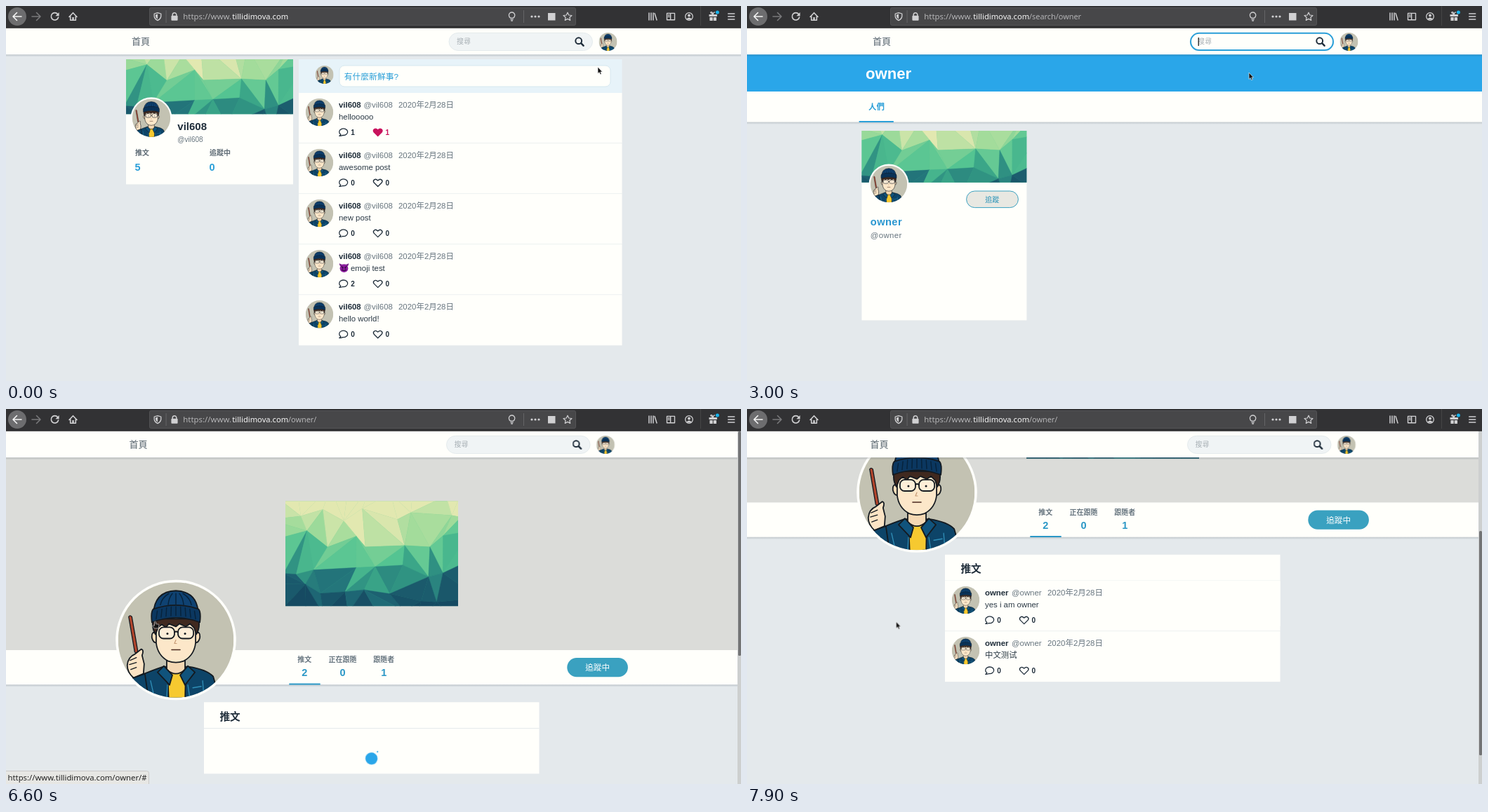
An HTML page that plays this animation: 1047 px wide and 535 px high, repeating every 8000 ms.

```html
<!DOCTYPE html>
<html lang="zh-Hant">
<head>
<meta charset="utf-8">
<title>Social feed demo</title>
<style>
html, body { margin: 0; width: 100%; height: 100%; overflow: hidden; background: #e4e9ec; }
svg#stage { display: block; width: 100vw; height: 100vh; }
text { font-family: "Liberation Sans", Arial, "Noto Sans CJK TC", "Noto Sans CJK SC", sans-serif; white-space: pre; }
.ui { font-family: "Noto Sans", "Open Sans", sans-serif; }
.b { font-weight: 700; }
.mid { text-anchor: middle; }
.line { fill: none; stroke-linecap: round; stroke-linejoin: round; }
.spin { animation: spin 2s linear infinite; }
.dot { animation: bounce 2s ease-in-out infinite; }
.late .spin, .late .dot { animation-delay: -628ms; }
.early .spin, .early .dot { animation-delay: -972ms; }
.late .dot.two { animation-delay: -1628ms; }
.early .dot.two { animation-delay: -1972ms; }
@keyframes spin { to { transform: rotate(360deg); } }
@keyframes bounce { 0%, 100% { transform: scale(0); } 50% { transform: scale(1); } }
</style>
</head>
<body>
<svg id="stage" viewBox="0 0 1047 535" preserveAspectRatio="none"></svg>
<script>
const LOOP = 8000;
const PAPER = '#fffffb', INK = '#1f2d3a', GREY = '#67757f', BLUE = '#2a9fd8', BAND = '#2aa6e9', TEAL = '#3aa1c0';
const USER = 'vil608', FOUND = 'owner', SITE = 'tillidimova.com';

// ---------- timeline ----------
const rules = [];
function track(sel, prop, keys, fmt = v => v) {
  const name = 'k' + rules.length;
  const body = keys.map(([t, v]) => `${t / LOOP * 100}%{${prop}:${fmt(v)}}`).join('');
  rules.push(`@keyframes ${name}{${body}}${sel}{animation:${name} ${LOOP}ms step-end infinite}`);
}
function show(sel, ...times) {
  const keys = times.map((t, i) => [t, 1 - i % 2]);
  if (times[0] > 0) keys.unshift([0, 0]);
  track(sel, 'opacity', keys);
}
const moveY = v => `translateY(${v}px)`;

// ---------- drawing helpers ----------
const at = (x, y, s, attr = '') => `<g transform="translate(${x} ${y})" ${attr}>${s}</g>`;
const rect = (x, y, w, h, fill, attr = '') => `<rect x="${x}" y="${y}" width="${w}" height="${h}" fill="${fill}" ${attr}/>`;
const circle = (x, y, r, fill, attr = '') => `<circle cx="${x}" cy="${y}" r="${r}" fill="${fill}" ${attr}/>`;
const path = (d, fill, attr = '') => `<path d="${d}" fill="${fill}" ${attr}/>`;
const line = (d, stroke, w = 1, attr = '') => `<path class="line" d="${d}" stroke="${stroke}" stroke-width="${w}" ${attr}/>`;
const text = (x, y, s, size, fill, cls = '', attr = '') =>
  `<text x="${x}" y="${y}" font-size="${size}" fill="${fill}" class="${cls}" ${attr}>${s}</text>`;
const group = (id, s, attr = '') => `<g id="${id}" ${attr}>${s}</g>`;
const shadow = (y, w = 1047) => rect(0, y, w, 3.4, 'url(#shade)');
const avatar = (x, y, r, ring = 0) =>
  (ring ? circle(x, y, r + ring, PAPER) : '') +
  `<use href="#face" x="${x - r}" y="${y - r}" width="${2 * r}" height="${2 * r}"/>`;
const cover = (x, y, w, h) =>
  `<svg x="${x}" y="${y}" width="${w}" height="${h}" viewBox="0 0 246 150" preserveAspectRatio="xMidYMid slice">${mosaic}</svg>`;

// ---------- low-poly cover ----------
function makeMosaic() {
  let seed = 11;
  const rnd = () => (seed = seed * 16807 % 2147483647) / 2147483647;
  const stops = [[226, 232, 176], [160, 219, 154], [84, 196, 146], [54, 160, 134], [32, 108, 120], [22, 74, 98]];
  const cols = 8, rows = 5, pts = [];
  for (let j = 0; j <= rows; j++)
    for (let i = 0; i <= cols; i++)
      pts.push([(i + (rnd() - .5) * .8) / cols * 276 - 15, (j + (rnd() - .5) * .8) / rows * 184 - 17]);
  const tone = v => {
    const k = Math.min(4.999, Math.max(0, v * 5)), i = k | 0;
    return `rgb(${stops[i].map((c, n) => Math.round(c + (stops[i + 1][n] - c) * (k - i)))})`;
  };
  const tri = (...p) => {
    const u = (p[0][0] + p[1][0] + p[2][0]) / 738, v = (p[0][1] + p[1][1] + p[2][1]) / 450;
    const c = tone(1.12 * (v - .24) + .5 * Math.abs(u - .5) + (rnd() - .5) * .22);
    return path(`M${p.map(q => q.map(n => n.toFixed(1))).join('L')}Z`, c, `stroke="${c}" stroke-width=".4"`);
  };
  let out = rect(0, 0, 246, 150, '#4cbf90');
  for (let j = 0; j < rows; j++)
    for (let i = 0; i < cols; i++) {
      const a = pts[j * (cols + 1) + i], b = pts[j * (cols + 1) + i + 1];
      const c = pts[(j + 1) * (cols + 1) + i], d = pts[(j + 1) * (cols + 1) + i + 1];
      out += rnd() < .5 ? tri(a, b, c) + tri(b, d, c) : tri(a, b, d) + tri(a, d, c);
    }
  return out;
}
const mosaic = makeMosaic();

// ---------- illustrated portrait ----------
function portrait() {
  const dark = '#141a20', o = `stroke="${dark}" stroke-width="1.8" stroke-linejoin="round"`;
  let ribs = '';
  for (let i = -4; i <= 4; i++) ribs += `M${i * 7} ${-30 - (16 - i * i) * .3}L${i * 6.6} ${-41 - (16 - i * i) * .4}`;
  for (let i = -2; i <= 2; i++) ribs += `M${i * 11} -50Q${i * 10} -60 ${i * 5} -66`;
  const lens = x => `<rect x="${x}" y="-18" width="22" height="16" rx="6.5" fill="#fdeed8" ${o}/>`;
  return circle(0, 0, 82, '#c3c2b2') + '<g clip-path="url(#round)">' +
    path('M-56 90L-49 50Q-36 44 -18 38L18 38Q44 42 53 52L64 90Z', '#0d4468', o) +
    path('M-12 40L-10 90H13L14 40Z', '#f6c930', o) +
    path('M-13 22V42Q0 54 13 42V22Z', '#f5d8b3', o) +
    path('M-17 37L-26 46L-9 64L-5 50ZM17 37L27 46L13 64L6 50Z', '#10537c', o) +
    line('M-12 64L-13 84M17 64L20 84M-36 58L-30 84M38 58L40 84M24 68L36 66', '#2f8fb8', 1.3) +
    path('M-28 -10Q-35 -13 -34 -3Q-32 5 -26 4ZM28 -10Q35 -13 34 -3Q32 5 26 4Z', '#f8ddb9', o) +
    path('M-28 -28H28V4Q26 22 11 30Q0 34 -11 30Q-26 22 -28 4Z', '#fce7c9', o) +
    path('M-32 -30Q-35 -18 -29 -8L-25 -18L-20 -22L-14 -18L-10 -23L0 -19L5 -23L14 -19L20 -23L26 -17L29 -8Q35 -18 32 -30Z', '#40291f', o) +
    path('M-32 -36Q-31 -69 0 -70Q31 -69 32 -36Z', '#0f4272', o) +
    path('M-34 -25Q-36 -40 -32 -44Q0 -55 32 -44Q36 -40 34 -25Q0 -38 -34 -25Z', '#0b3760', o) +
    line(ribs, '#07233c', 1.5) +
    lens(-24) + lens(3) + line('M-2 -11Q0 -13 3 -11', dark, 1.8) +
    circle(-12, -9, 1.5, dark) + circle(13, -9, 1.5, dark) +
    line('M-6 14H6', '#4a2a20', 1.6) + line('M0 0L-2 5H1', '#c79b76', 1.2) +
    path('M-67 -33Q-65 -36 -62.5 -33L-54 16Q-56 20 -58.5 17Z', '#b1452c', `stroke="${dark}" stroke-width="1.3"`) +
    path('M-69 36Q-68 24 -58 20L-49 13Q-45 14 -48 22L-45 34L-46 48L-60 54Q-69 46 -69 36Z', '#fbe3c4', o) +
    line('M-65 29L-56 25M-66 35L-56 32M-64 42L-56 39', dark, 1.3) +
    path('M-66 56L-44 48L-38 90H-60Z', '#0d4468', o) + '</g>';
}

// ---------- browser bar ----------
function browser() {
  const c = '#d0d0d2';
  let s = rect(0, 0, 1047, 31.4, '#323234') + rect(0, 30.7, 1047, .8, '#1c1c1e') +
    rect(204.5, 2.5, 607, 25, '#474749', 'rx="2" stroke="#5a5a5c" stroke-width=".8"');
  s += circle(16, 15, 13, '#6d6d6f') + line('M22 15H10.5M15.5 9.5L10 15L15.5 20.5', '#f4f4f4', 1.6);
  s += line('M37 15H48.5M43.5 9.5L49 15L43.5 20.5', '#78787a', 1.6);
  s += line('M73.6 11.6A5.2 5.2 0 1 0 74.6 16', c, 1.6) + path('M75.6 9V14.2H70.4Z', c);
  s += line('M90 15.5L95.5 9.7L101 15.5M91.7 14.5V20.2H99.3V14.5', c, 1.6) + rect(94.3, 16, 2.4, 4, c);
  s += line('M216 9.6L220.8 11V14.6Q220.5 18.3 216 20.6Q211.5 18.3 211.2 14.6V11Z', c, 1.3) + path('M216 11.6V18.4Q213 16.6 213 14.4V12.4Z', c);
  s += rect(227.6, 6, .9, 18, '#69696b') + rect(235.4, 13.8, 9.2, 7, c, 'rx="1"') + line('M237.2 14V12.5A2.8 2.8 0 0 1 242.8 12.5V14', c, 1.5);
  s += text(252.3, 18.6, 'https://www.', 11.4, '#b4b4b6', 'ui') + text(322.3, 18.6, SITE, 11.2, '#f6f6f6', 'ui');
  s += group('urlA', text(402, 18.6, `/search/${FOUND}`, 10.9, '#b4b4b6', 'ui'));
  s += group('urlB', text(402, 18.6, `/${FOUND}/`, 10.9, '#b4b4b6', 'ui'));
  s += line('M718.6 17.2Q716.4 15.4 716.4 13.2A4.2 4.2 0 0 1 724.8 13.2Q724.8 15.4 722.6 17.2ZM719 19.2H722.2M719.8 21H721.4', c, 1.3);
  s += rect(737, 6, .9, 18, '#69696b') + [749, 754, 759].map(x => circle(x, 15, 1.6, c)).join('');
  s += rect(772, 10, 10.5, 10.5, c);
  s += line('M800 9.2L801.8 13L806 13.5L802.9 16.3L803.7 20.4L800 18.4L796.3 20.4L797.1 16.3L794 13.5L798.2 13Z', c, 1.2);
  s += line('M916 10V20M919 10V20M922 10V20M924 10.4L927 20', c, 1.5);
  s += line('M941.5 10.4H952.5V19.8H941.5ZM946.6 10.4V19.8M943.3 13H945M943.3 15.4H945', c, 1.4);
  s += circle(973, 15, 5.3, 'none', `stroke="${c}" stroke-width="1.3"`) + circle(973, 13.6, 2, c) + path('M969.4 18.2Q973 14.6 976.6 18.2Q973 21 969.4 18.2Z', c);
  s += rect(989, 0, .8, 28, '#4a4a4c');
  s += rect(1001.5, 12, 11.4, 3, c) + rect(1002.4, 16, 4.3, 5, c) + rect(1007.7, 16, 4.3, 5, c) + line('M1007.2 12Q1002 9.4 1004.6 8.6Q1006.6 8.4 1007.2 12Q1008 8.6 1009.6 9', c, 1.2) + circle(1013.4, 9, 2.5, '#17b4ee');
  return s + line('M1028.7 11H1037.7M1028.7 15H1037.7M1028.7 19H1037.7', c, 1.5);
}

// ---------- site header ----------
function header() {
  const typed = [5.6, 12.8, 18.3, 23.9].map((w, i) =>
    group('type' + i, text(642.3, 54, FOUND.slice(0, i + 1), 10, '#111') + rect(642.5 + w, 45, 1, 12, '#111'))).join('');
  const pill = 'rx="13"';
  return rect(-10, 31, 1070, 38.2, PAPER) + at(-5, 0, shadow(69.2, 1070)) +
    text(179, 55.3, '首頁', 13, '#56636d') +
    rect(631, 38.3, 204.5, 25.2, '#f0f4f5', pill + ' stroke="#e0e7ea" stroke-width=".8"') +
    group('focus', rect(632, 38.8, 203, 24.2, PAPER, `rx="12.1" stroke="${BLUE}" stroke-width="2"`)) +
    group('hint', text(642, 54.2, '搜尋', 10, '#a9b1b6')) + typed + group('caret', rect(642.6, 45, 1.2, 12, '#111')) +
    circle(815.7, 49.7, 4.4, 'none', `stroke="${INK}" stroke-width="2"`) + line('M819.2 53.2L822.6 56.6', INK, 2.5) +
    avatar(857.5, 51, 13);
}

// ---------- posts ----------
const HEART = 'M0 5.5L-5.5 0C-7.8 -3.1 -3.9 -7 0 -3.1C3.9 -7 7.8 -3.1 5.5 0Z';
const BUBBLE = 'M-3.9 3.4A6 4.8 0 1 1 -1.2 4.4C-2.6 5.2 -4.2 5.4 -6 5.3C-4.9 4.8 -4.2 4.2 -3.9 3.4Z';
const imp = at(64.5, 33.5,
  path('M-6.6 -6.6Q-6.6 -2 -4 -2.6L-1.6 -5Q-5 -4.4 -6.6 -6.6ZM6.6 -6.6Q6.6 -2 4 -2.6L1.6 -5Q5 -4.4 6.6 -6.6Z', '#6d1481') +
  circle(0, .5, 5.9, '#8c1c9e') + line('M-3.6 -1.8L-1.2 -.6M3.6 -1.8L1.2 -.6M-2.8 2.6Q0 5 2.8 2.6', '#2c0638', 1.1) +
  circle(-2, .5, .8, '#2c0638') + circle(2, .5, .8, '#2c0638'));

// xs: where the handle and the date begin
function post(y, w, who, xs, body, replies, likes, last) {
  const hot = likes > 0, c = hot ? '#c8125c' : INK;
  return at(0, y, rect(0, 0, w, 72, PAPER) + (last ? '' : rect(0, 71.4, w, .9, '#e1e7e9')) + avatar(29.5, 27.5, 19.7) +
    text(57, 20.6, who, 11.4, INK, 'b') + text(xs[0], 20.6, '@' + who, 11.4, GREY) + text(xs[1], 20.6, '2020年2月28日', 11.45, GREY) +
    (body.imp ? imp + text(74, 37.6, body.imp, 11.4, '#2b3945') : text(57, 37.6, body, 11.4, '#2b3945')) +
    at(63.8, 56, line(BUBBLE, INK, 1.3)) + text(74.2, 59.9, replies, 10, INK, 'b') +
    at(112.7, 56, path(HEART, hot ? c : 'none', `stroke="${c}" stroke-width="1.3" stroke-linejoin="round"`)) + text(123.6, 59.9, likes, 10, c, 'b'));
}

// ---------- pages ----------
function home() {
  const rows = [['hellooooo', 1, 1], ['awesome post', 0, 0], ['new post', 0, 0], [{ imp: 'emoji test' }, 2, 0], ['hello world!', 0, 0]];
  return rect(171, 76, 238, 178.4, PAPER) + cover(171, 76, 238, 78.3) + avatar(207, 159.7, 27.2, 2.2) +
    text(244.3, 177, USER, 15, INK, 'b') + text(244.3, 193.5, '@' + USER, 10, GREY) +
    text(184, 212.8, '推文', 10, '#5c6973', 'b') + text(290, 212.8, '追蹤中', 10, '#5c6973', 'b') +
    text(183.6, 235.2, 5, 14.5, BLUE, 'b') + text(289.6, 235.2, 0, 14.5, BLUE, 'b') +
    rect(417, 76, 460.5, 48.2, '#e7f3f9') + avatar(453.6, 98, 13) +
    rect(475, 85, 386, 30, PAPER, 'rx="7" stroke="#d3e6ee" stroke-width=".9"') + text(481.7, 104.8, '有什麼新鮮事?', 11.8, BLUE) +
    at(417, 124, rows.map((r, i) => post(i * 72.05, 460.5, USER, [92.5, 142], ...r, i === 4)).join(''));
}

function spinner(id, x, y) {
  const dot = (dy, cls) => at(-6.5, dy, circle(0, 0, 9.75, BAND, `class="dot ${cls}"`));
  return `<clipPath id="${id}Clip"><rect id="${id}Win" width="1047" height="1"/></clipPath>` +
    at(0, y, group(id + 'Mid', at(x, 0, `<g class="spin">${dot(-6.5, '') + dot(6.5, 'two')}</g>`)), `clip-path="url(#${id}Clip)"`);
}

function search() {
  const pill = (fill, stroke) => rect(312.6, 264, 73.8, 23.6, fill, `rx="11.8" stroke="${stroke}" stroke-width="1"`);
  const label = (s, fill) => text(349.3, 279.6, s, 10, fill, 'mid');
  const name = fill => text(175.8, 312.8, FOUND, 14.6, fill, 'b', 'letter-spacing=".45"');
  const card = rect(163.4, 178, 235, 270.4, PAPER) + cover(163.4, 178, 235, 73.7) + avatar(202, 254, 26.2, 2.2) +
    pill('#e8e8e2', TEAL) + group('hover', pill('#e3f0f1', TEAL)) + label('追蹤', '#2a93b8') +
    group('followed', pill(TEAL, TEAL) + label('追蹤中', '#fff')) +
    name('#2a97d0') + group('nameHot', name('#1c86ad')) +
    group('dotted', rect(176, 298.5, 45.5, 17, 'none', 'stroke="#4b6f80" stroke-width=".8" stroke-dasharray="1 1"')) +
    text(175.8, 331.3, '@' + FOUND, 11.4, GREY, '', 'letter-spacing=".4"');
  return rect(0, 31, 1047, 504, '#e4e9ec') + rect(0, 69, 1047, 53, BAND) + text(169, 103.6, FOUND, 22.1, '#fff', 'b') +
    rect(0, 122, 1047, 43.6, PAPER) + shadow(165.6) + text(173, 148, '人們', 11.4, BLUE, 'b') + rect(159.6, 164, 49.2, 2, BLUE) +
    `<g class="early">${spinner('sa', 523.5, 178)}</g>` + group('cardShow', group('card', card));
}

// laid out at scroll 0; the cover begins under the header
function profile() {
  const stat = (x, s, n) => text(x, 361, s, 10, GREY, 'b mid') + text(x, 381.2, n, 14.5, '#2a97c6', 'b mid');
  const rows = at(282, 455.6, post(0, 477.5, FOUND, [95, 146], 'yes i am ' + FOUND, 0, 0, false) +
    post(72.05, 477.5, FOUND, [95, 146], '中文测试', 0, 0, true));
  const content = rect(0, 69, 1047, 275, '#dbdcd9') + cover(398, 131.3, 246, 150) +
    rect(0, 344, 1047, 49.2, PAPER) + shadow(393.2) + avatar(242, 329.5, 82.3, 3.5) +
    stat(425.3, '推文', 2) + stat(479.5, '正在跟隨', 0) + stat(538.3, '跟隨者', 1) + rect(403.3, 391.5, 44.4, 2, '#2a97c6') +
    rect(799.3, 355, 86.6, 27.3, TEAL, 'rx="13.6"') + text(842.6, 373, '追蹤中', 11.6, '#fff', 'mid') +
    rect(282, 418.3, 477.5, 102, PAPER) + text(304.4, 443.6, '推文', 14.7, INK, 'b') + rect(282, 455.2, 477.5, .9, '#e1e7e9') +
    `<g class="late">${spinner('sb', 520, 456)}</g>` + group('rowsShow', group('rows', rows));
  return rect(0, 31, 1047, 504, '#e4e9ec') + group('scroll', content);
}

const status = (id, w, s) => group(id, path(`M-1 536V516.5H${w - 3}Q${w} 516.5 ${w} 519.5V536Z`, '#e7e7e4', 'stroke="#c6c6c4" stroke-width=".9"') +
  text(2.5, 530, `https://www.${SITE}${s}`, 11.3, '#222', 'ui'));

const edge = 'stroke="#fff" stroke-width=".6" stroke-linejoin="round"';
const cursors =
  group('arrow', path('M0 0V9.4L2.1 7.5L3.6 10.8L5.2 10.1L3.8 7H6.5Z', '#111', edge)) +
  group('beam', line('M-2 -4.5H2M-2 4.5H2M0 -4.5V4.5', '#fff', 2) + line('M-2 -4.5H2M-2 4.5H2M0 -4.5V4.5', '#333', 1)) +
  group('hand', path('M-1.5 0Q-.4 -1.4 .4 0V3L4 3.6Q5.2 4 5 5.6L4 9.4H-1.6L-4.4 5.8Q-4 4.4 -1.5 5.6Z', '#111', edge));

// ---------- assemble ----------
document.getElementById('stage').innerHTML =
  `<defs><linearGradient id="shade" x2="0" y2="1"><stop stop-color="#203040" stop-opacity=".19"/><stop offset="1" stop-color="#203040" stop-opacity="0"/></linearGradient>
  <clipPath id="round"><circle r="82"/></clipPath><symbol id="face" viewBox="-82 -82 164 164">${portrait()}</symbol></defs>` +
  rect(0, 0, 1047, 535, '#e4e9ec') +
  group('home', home()) + group('search', search()) + group('profile', profile()) +
  group('head', header()) +
  group('bar', rect(1042, 31, 5, 504, '#cdcfcf') + group('thumb', rect(1043, 0, 4, 320, '#737475', 'rx="1.5"'))) +
  browser() + status('linkA', 191, '/' + FOUND) + status('linkB', 203.5, `/${FOUND}/#`) + group('cursor', cursors);

show('#home', 0, 2000);
show('#search,#urlA', 2000, 6500);
show('#profile,#urlB,#bar', 6500);
track('#head', 'transform', [[0, 0], [6500, -3.5]], v => `translateX(${v}px)`);

track('#focus', 'opacity', [[0, 0], [600, 1], [4600, .5], [4700, .15], [5000, 0]]);
show('#hint', 0, 800, 2000);
[800, 900, 1400, 1600, 2000].forEach((t, i, a) => i < 4 && show('#type' + i, t, a[i + 1]));
show('#caret', 600, 800, 2000, 3300, 4400, 4600);

const shrinkA = [[0, 64], [2600, 53], [2700, 32], [2800, 11], [2900, 0]];
const shrinkB = [[0, 64], [6900, 53], [7000, 30], [7100, 8.5], [7200, 0]];
for (const [id, body, keys] of [['sa', 'card', shrinkA], ['sb', 'rows', shrinkB]]) {
  track(`#${id}Win`, 'transform', keys, v => `scaleY(${v})`);
  track(`#${id}Mid`, 'transform', keys, v => moveY(v / 2 + 1.5));
  track('#' + body, 'transform', keys, moveY);
}
show('#cardShow', 2300);
show('#rowsShow', 6700);
show('#hover', 3600, 5000);
show('#followed', 5400);
show('#nameHot', 5900);
show('#dotted', 6300);
show('#linkA', 5900, 6500);
show('#linkB', 6600, 7300);

const scroll = [[0, 0], [6800, 15], [6900, 50], [7000, 85], [7100, 107], [7200, 115], [7300, 120], [7400, 132], [7500, 147], [7600, 156], [7800, 186], [7900, 210.5]];
track('#scroll', 'transform', scroll, v => moveY(-v));
track('#thumb', 'transform', scroll, v => moveY(v < 107 ? 32 + v * .636 : 100 + (v - 107) * .715));

track('#cursor', 'transform', [
  [0, [843, 87]], [100, [838, 83]], [200, [822, 70]], [300, [795, 60]], [400, [765, 55]], [500, [751, 53]],
  [2900, [745, 60]], [3000, [715, 95]], [3100, [660, 140]], [3200, [590, 180]], [3300, [520, 215]], [3400, [450, 245]],
  [3500, [395, 264]], [3600, [358, 273]], [3700, [344, 276]], [3800, [343, 277]], [3900, [342.5, 277.5]],
  [5600, [335, 285]], [5700, [300, 296]], [5800, [255, 303]], [5900, [225, 304]], [6000, [214, 304]], [6500, [213, 303.5]], [7800, [212.5, 303.5]]
], p => `translate(${p[0]}px,${p[1]}px)`);
show('#arrow', 0, 300, 2900, 3600, 5600, 5900, 7100);
show('#beam', 300, 2900);
show('#hand', 3600, 5600, 5900, 7100);

const sheet = document.createElement('style');
sheet.textContent = rules.join('\n');
document.head.append(sheet);
</script>
</body>
</html>
```
